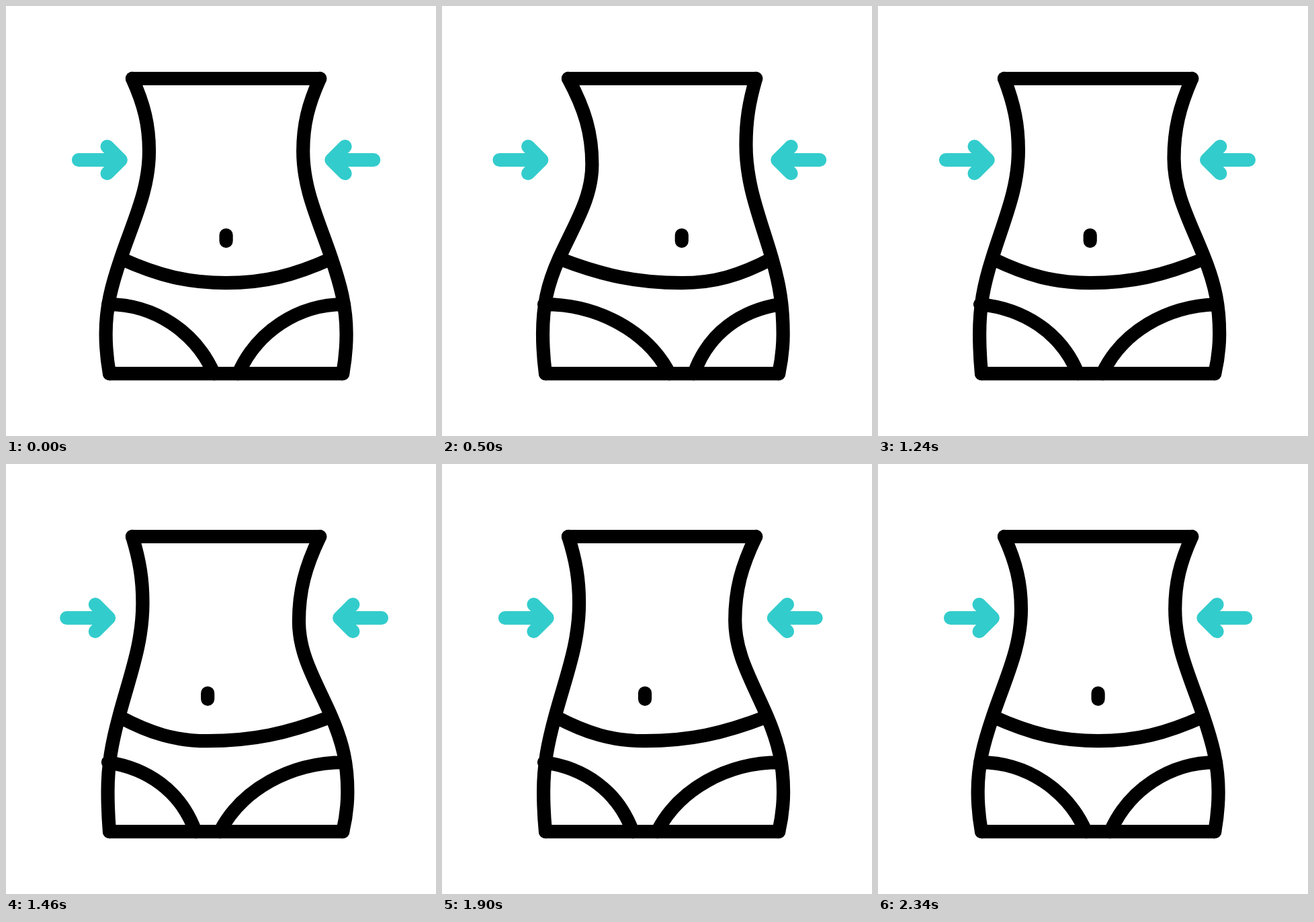
An HTML page for the animation above (2400 ms loop, 640 by 640 pixels).

```html
<!DOCTYPE html>
<html lang="en">
<head>
<meta charset="utf-8">
<title>Waist</title>
<style>
html, body { margin: 0; width: 100%; height: 100%; overflow: hidden; background: #fff; }
svg { display: block; width: 100vw; height: 100vh; }
</style>
</head>
<body>
<svg viewBox="0 0 640 640" fill="none" stroke="#000" stroke-width="20.2" stroke-linecap="round" stroke-linejoin="round">
  <path d="M188 108H467.2M154 547.2H501.2"/>
  <path id="body"/>
  <path id="navel" d="M0 341V349.8"/>
  <g stroke="#33cccc">
    <path id="arrowL" d="M108 229.1H170.8M150.6 209L170.8 229.1L150.6 249.2"/>
    <path id="arrowR" d="M547.2 229.1H484.4M504.6 209L484.4 229.1L504.6 249.2"/>
  </g>
</svg>
<script>
const LOOP = 2400, AXIS = 327.6, TOP = 108, BOTTOM = 547.2;
const BOW = 1.95;   // end slope of an arc, relative to its chord
const LEAN = 1.28;  // slope where waist turns into hip, relative to its chord
const $ = id => document.getElementById(id);
const clamp = x => Math.min(1, Math.max(0, x));
const mix = (a, b, k) => a + (b - a) * k;
const mirror = x => 2 * AXIS - x;

// Cubic from (x0, y0) to (x1, y1) with slopes s0 and s1, in x per y
function arc(x0, y0, s0, x1, y1, s1) {
  const h = 0.36 * (y1 - y0);
  return [x0 + s0 * h, y0 + h, x1 - s1 * h, y1 - h, x1, y1];
}
const swap = p => p.map((_, i) => p[i ^ 1]);

function side(top, bottom, s) {
  const hipY = 488, jointY = 375;
  const sTop = BOW * (s.waist - top) / (s.waistY - TOP);
  const sJoint = LEAN * (s.joint - s.waist) / (jointY - s.waistY);
  const sBottom = BOW * (bottom - s.hip) / (BOTTOM - hipY);
  return [top, TOP,
    ...arc(top, TOP, sTop, s.waist, s.waistY, 0),
    ...arc(s.waist, s.waistY, 0, s.joint, jointY, sJoint),
    ...arc(s.joint, jointY, sJoint, s.hip, hipY, 0),
    ...arc(s.hip, hipY, 0, bottom, BOTTOM, sBottom)];
}

function band(x0, mid, x1) {
  const y = 376, low = 412.2;
  const slope = x => BOW * (low - y) / (mid - x);
  return [x0, y,
    ...swap(arc(y, x0, slope(x0), low, mid, 0)),
    ...swap(arc(low, mid, 0, y, x1, slope(x1)))];
}

// Elliptic arc; a narrow leg starts with a tilt
function leg(x0, x1) {
  const y = 444, dx = x1 - x0, tilt = 0.3 * Math.max(0, 157.5 - Math.abs(dx));
  return [x0, y, x0 + 0.434 * dx, y + tilt,
    x1 - 0.174 * dx, mix(BOTTOM, y, 0.607), x1, BOTTOM];
}

function pose(navel, l, r) {
  return {
    navel,
    lines: [
      side(188, 154, l), side(467.2, 501.2, r),
      band(l.joint, navel, r.joint),
      leg(152, navel - 18.2), leg(mirror(152), navel + 18.2)
    ]
  };
}

const rest = pose(AXIS,
  { waist: 213, waistY: 216, joint: 171, hip: 148.6 },
  { waist: mirror(213), waistY: 216, joint: mirror(171), hip: mirror(148.6) });
const right = pose(358.3,
  { waist: 223.9, waistY: 237, joint: 174.7, hip: 150.1 },
  { waist: 453, waistY: 206, joint: 491.3, hip: 507.7 });
const left = pose(296.9,
  { waist: 202.3, waistY: 205, joint: 168, hip: 151.6 },
  { waist: 435, waistY: 236, joint: 483.5, hip: 508.4 });

const moves = [
  { start: 100, end: 620, from: rest, to: right, h: 0.7 },
  { start: 620, end: 1720, from: right, to: left, h: 0.7 },
  { start: 1720, end: 2340, from: left, to: rest, h: 0.45 }
];
// Arrows pull away and return twice: start, farthest, back
const pulls = [[110, 620, 1095], [1095, 1700, 2088]];

// Symmetric cubic ease with handles (h, 0) and (1 - h, 1)
function ease(x, h) {
  let lo = 0, hi = 1;
  for (let i = 0; i < 24; i++) {
    const u = (lo + hi) / 2, v = 1 - u;
    if (3 * u * v * (v * h + u * (1 - h)) + u * u * u < x) lo = u; else hi = u;
  }
  return lo * lo * (3 - 2 * lo);
}

const pull = t => pulls.reduce((sum, [a, b, c]) =>
  sum + clamp(Math.min((t - a) / (b - a), (c - t) / (c - b))), 0);

const toPath = ([x, y, ...rest]) => `M${x} ${y}C${rest.map(v => v.toFixed(2)).join(' ')}`;
const shift = (id, x) => $(id).setAttribute('transform', `translate(${x} 0)`);

function draw(t) {
  const { start, end, from, to, h } = moves.find(m => t < m.end) || moves[2];
  const k = ease(clamp((t - start) / (end - start)), h);
  const lines = from.lines.map((p, i) => p.map((v, j) => mix(v, to.lines[i][j], k)));
  $('body').setAttribute('d', lines.map(toPath).join(''));
  shift('navel', mix(from.navel, to.navel, k));
  shift('arrowL', -29.3 * pull(t));
  shift('arrowR', 19.5 * pull(t));
}

const begin = performance.now();
function tick() {
  draw((performance.now() - begin) % LOOP);
  requestAnimationFrame(tick);
}
draw(0);
requestAnimationFrame(tick);
</script>
</body>
</html>
```
